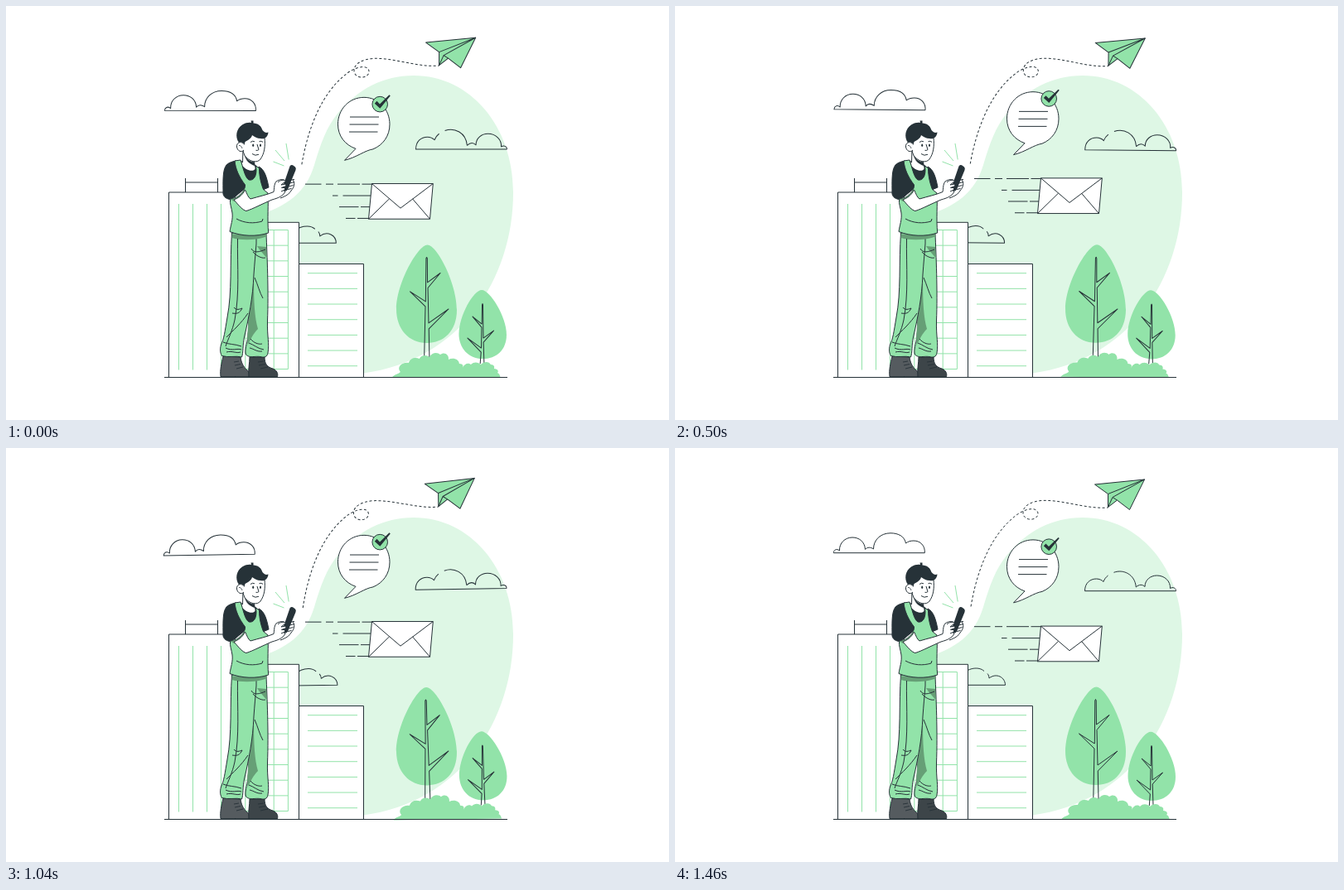
Write an HTML page with a canvas that moves like this. It is 800x500 px and loops after 1500 ms.

```html
<!DOCTYPE html>
<html lang="en">
<head>
<meta charset="utf-8">
<title>Message delivery</title>
<style>
  html, body { margin: 0; width: 100%; height: 100%; overflow: hidden; background: #fff; }
  canvas { display: block; width: 800px; height: 500px; }
</style>
</head>
<body>
<canvas id="stage"></canvas>
<script>
const canvas = document.getElementById('stage');
const ctx = canvas.getContext('2d');
const ratio = window.devicePixelRatio || 1;
canvas.width = 800 * ratio;
canvas.height = 500 * ratio;

const LOOP = 1500, FRAMES = 36;
const INK = '#263238', GREEN = '#92e3a9', PALE = '#def7e5', SHADE = '#669f76', WHITE = '#fff';

function shape(d, fill, stroke = INK, width = 1) {
  const path = new Path2D(d);
  if (fill) { ctx.fillStyle = fill; ctx.fill(path); }
  if (stroke) { ctx.strokeStyle = stroke; ctx.lineWidth = width; ctx.stroke(path); }
}
const line = (d, color = INK, width = 1) => shape(d, null, color, width);
const solid = (d, color) => shape(d, color, null);

function ellipse(x, y, rx, ry, fill, stroke) {
  ctx.beginPath();
  ctx.ellipse(x, y, rx, ry, 0, 0, 2 * Math.PI);
  if (fill) { ctx.fillStyle = fill; ctx.fill(); }
  if (stroke) { ctx.strokeStyle = stroke; ctx.lineWidth = 1; ctx.stroke(); }
}

function rotated(x, y, degrees, draw) {
  ctx.save();
  ctx.translate(x, y);
  ctx.rotate(degrees * Math.PI / 180);
  ctx.translate(-x, -y);
  draw();
  ctx.restore();
}

function drawBackdrop() {
  solid('M492 84 C560 84 612 145 612 225 C612 330 548 428 431 443.5 H300 V254 C340 242 362 225 372 192 C380 165 387 146 400 130 C425 100 455 84 492 84Z', PALE);
}

function drawClouds() {
  line('M191.3 126.7 H301.3 C302 118 296 112 288 112 C284 112 281 113 278.5 115 C277 107 270 102.8 260 102.8 C248 102.8 239.5 111 239.5 122 C236 119.5 232 119.5 229.5 122.5 C229 113 222 108 214 108 C205 108 198 115 198.5 124 C195 121 191.5 123 191.3 126.7Z');
  line('M604.5 172.7 H494.5 C494.5 163 501 158 508.5 158 C512 158 515 159.5 517 161.5 C518 158.5 520 156 522.5 154 M529.5 150.3 C541 146 555 152.5 556.3 168 C560 164.5 564 164.5 567 167.5 C567 159 574 154 581.5 154 C591 154 598 161 597.5 169.5 C601 167.5 604.5 169 604.5 172.7');
  line('M345 276 C352 265 367 263.5 373 269.5 M377 272.5 C378.3 274 379 276 379 278 C388 271 398.5 277 398.5 286.3 H345');
}

function drawBuildings() {
  line('M216.5 208 V225 M255.5 208 V225 M216.5 213 H255.5');
  shape('M196.5 225 H276.5 V448.5 H196.5Z', WHITE);
  for (let i = 0; i < 4; i++) line(`M${208.5 + i * 17} 239 V439.5`, GREEN);

  shape('M276.5 261.3 H353.5 V448.5 H276.5Z', WHITE);
  for (let i = 0; i < 4; i++) line(`M${288.8 + i * 17.2} 270.5 V438.5`, GREEN);
  for (let i = 0; i < 10; i++) line(`M288.8 ${270.5 + i * 18.67} H340.4`, GREEN);

  shape('M353.5 311.5 H431.5 V448.5 H353.5Z', WHITE);
  for (let i = 0; i < 7; i++) line(`M364 ${322.7 + i * 18.67} H424`, GREEN);
}

function drawTrees() {
  solid('M508.3 288.5 C520 288.5 544 335 544 367 C544 393 528 407 508 407 C486 407 471 390 471 366 C471 335 497 288.5 508.3 288.5Z', GREEN);
  line('M504.8 424 L506 363 L487.5 345 L506.3 357 L506.8 305 Q507.5 302 508.2 305 L508.5 334 L524 322.5 L509 340.5 L510 383 L534 366 L510.3 390 L511 424');
  solid('M574 342.8 C584 342.8 604 375 604 397 C604 415 592 426 575 426 C558 426 546.5 413 546.5 396 C546.5 374 564 342.8 574 342.8Z', GREEN);
  line('M572.3 432 L573.3 418 L557 401 L573.6 413 L574 388 L563 375 L574.2 384 L574.5 361 Q575 358 575.5 361 L576 401 L588.5 392 L576.2 406 L577 432');
  solid('M466 448.5 C470 444 473 445 476 442 C471 436 478 430 486 431 C488 425 494 424 499 426 C501 421 508 421 511 424 C514 418 521 418 524 421 C529 417 535 421 534 427 C540 424 547 427 547 432 C552 432 552 435 551 437 C553 432 558 430 561 433 C565 429 570 430 573 433 C577 429 583 429 585 433 C589 433 590 436 589 438 C594 438 595 442 593 443 C596 444 596 447 597 448.5Z', GREEN);
}

function drawPlane() {
  ctx.setLineDash([3, 2.5]);
  line('M357 191.5 C364 150 380 105 412 81 C424 72 438 71 438 79.5 C437 88.5 421 88.5 420 79 C419 70 430 64.5 442 63.5 C468 62 495 74 522.5 72');
  ctx.setLineDash([]);
  shape('M506.5 44 L566.5 38 L548.5 74.5 L533.5 63 L522.5 71.5 V55.5Z', GREEN);
  line('M522.5 55.5 L566.5 38 L528 59.5 L522.5 71.5 M528 59.5 L533.5 63');
}

function drawMessages() {
  shape('M422 172.5 C409 168 400.5 157 400.5 143 C400.5 125 414 110.5 432 110.5 C449.5 110.5 463 125 463 143 C463 157 455 168 443 173 C433 174.5 423 183 408.5 186.5 Z', WHITE);
  line('M415 134.2 H450 M414.5 143.2 H449.5 M414 152.2 H448.5');
  ellipse(451.2, 118.8, 9.3, 9.3, GREEN, INK);
  solid('M447.5 115 L451 118.6 L462.5 107.5 L463.8 108.6 L451.3 123.8 L444.8 117.8Z', INK);

  shape('M441.5 214.7 H515.3 L511.5 257.4 H437.5Z', WHITE);
  line('M441.5 214.7 L476 244.3 L515.3 214.7 M437.5 257.4 L462.5 233 M511.5 257.4 L490.5 233');
  line('M361 215.3 H380.5 M386 215.3 H395 M400 215.3 H427 M429.5 215.3 H441.5');
  line('M394 229.2 H400.5 M406.5 229.2 H440 M402 242.8 H425.5 M428 242.8 H439 M410 256.6 H421.5 M424 256.6 H437.5');
}

function drawLegs() {
  // Boots
  shape('M262 423 L283 424 C284 431 286 435 291 440 C294 442 294 445 293 447.7 H259 C258 439 260 432 262 423Z', '#555b5f');
  shape('M294 424 H312 C312 432 315 436 322 438 C327 440 328.5 444 327.5 447.7 H293 C292 439 294 431 294 424Z', '#3d4549');
  line('M275 430 L281 429 M276 434 L283 432.5 M278 438 L286 436 M304 430 L311 429 M305 434 L313 432.5 M307 438 L316 436', INK, .9);

  // Trousers
  shape('M290 275 H314 C315 300 317 345 315.5 380 C315 400 318 407 316 419 C315 424 312 424.5 308 423.8 C301 422 294 426 289.5 421 C287.5 416 291 408 292 398 C295 375 290 330 290 275Z', GREEN);
  solid('M299 330 C299 358 300 376 304 390 C298 396 295 403 292 409 C290 400 292 385 295 365Z', SHADE);
  shape('M272.5 274 C270 310 273 345 267 376 C264 394 263 402 259.5 409 C257.5 416 259 420 260.5 422.5 C268 425 278 422 284.5 424 C286.5 419 285.5 409 287.5 400 C293 376 298 352 299 324 C300 310 301 300 302 287 V275Z', GREEN);
  solid('M272.8 275.5 H314.3 V278.5 C300 283.5 283 283 272.6 280Z', SHADE);
  solid('M303 290 C307 296 311 300 314.5 304 L314 291Z', SHADE);
  line('M279.5 281 C279 315 282 347 276 379 C273 393 268 402 265 411');
  line('M296 293 C299 299 306 297 313 294 M298 297 C303 303 310 305 313 304 M300 328 C304 337 306 346 310 353 M292 371 C284 383 274 392 266 400');
  line('M275 364 C278 368 282 366 285 365 C282 371 279 372 273 371 M262 406 C269 409 276 408 284 411 M265 413 C273 417 279 413 284 415 M266 418 C273 416 278 420 283 418');
  line('M293 407 C299 409 304 414 311 415 M294 413 C299 414 303 418 309 417 M295 402 C299 407 305 409 309 408');
}

function drawTorso() {
  // Shirt and vest
  shape('M305 194 C312 197 315 208 317 219 L310 222 L303 205Z', INK);
  shape('M277 187 L287 188 L302 193 L307 200 L309 220 L290 219 L272 234 C266 233 263 231 262 227 C262 213 261 198 266 192 C269 189 273 188 277 187Z', INK);
  solid('M285 180 L300 184 L300.5 197 C297 201 289 198 284.5 192Z', WHITE);
  shape('M276 187 L283 186 C286 194 288 207 293 210 C298 211 302 207 302 198 L301.5 193 L305.5 196 C305.5 206 308 215 310.5 221.5 L316 226 C317 240 315 256 316.7 274 C302 279 284 278 270 272.5 C271 265 274 258 273 250 C272 243 270 239 270.5 234 C280 232 289 224 288.5 216 C281 206 277 197 276 187Z', GREEN);
  solid('M270.5 233 C279 233 284 228 288 221 L291 235 L275 236Z', SHADE);
  line('M278 257 C288 262.5 299 263 309 260 L310 257');
}

function drawHead() {
  line('M286 172 L285.5 189 M299 187 L300.5 194');
  solid('M287 178 C290 186 295 188 300 188.5 L300.3 193 C294 191 289 187 287 178Z', INK);
  shape('M286 156 C293 151 307 151 312 159 C313 169 312 178 307 185 C303 190 295 188 290 183 C287 180 286 175 285.5 172Z', WHITE);
  shape('M286.5 166 C283 163 278 165 278.5 170 C279 175 284 177.5 287 174', WHITE);
  line('M281 168.5 C283 168 284.5 170 285 172', INK, .8);
  solid('M281 165 C276 158 278 148 285 143.5 C289 141 293 140.5 296 141 L295.5 138.5 L298.5 138.5 L298.5 141.5 C304 141.5 308 145 309.5 150 C312 153 314 153.5 316.5 152.5 C316 158 312 161.5 307 160 C303 160 300 158 297 156 C296 160 292 162 288.5 164 L287.5 168 L286 165 C284 164 282 164 281 165Z', INK);
  ellipse(298.2, 168.2, 1, 1.8, INK);
  ellipse(307, 168.2, 1, 1.8, INK);
  line('M295 164.5 Q297.5 162.3 300 163.8 M305.5 163.8 Q307.5 162.5 310 164.3 M303 167 L305 173.5 Q303.5 175 301.5 174.3 M297 178.5 Q300.5 181.5 305 179.3');
}

function drawArms() {
  shape('M317 224 C325 224 332 222 337 216 L346 212 C349 215 347 220 343 225 C337 231 327 234 317 246Z', WHITE, null);
  line('M331 232 C337 230 342 227 344 223 C348 219 349 213 346 210');
  shape('M275 234 C280 232 285 229 288.5 222 C291 227 292 231 295 233 C305 230 315 228 323 224.5 C324 220 323 216 326 212 C330 209 335 209 337 211 C333 213 331 216 331 218 L337 216.5 L338 219 L334 222 L337 224 C334 230 328 232 321 234 C309 239 298 245 290 247.5 C286 247 281 241 275 234Z', WHITE);
  solid('M342.5 193.5 Q344 191.5 346 192.3 L348.8 194.3 Q350.5 196 349.5 198.2 L340 221.5 Q338.5 224 336.2 223.2 L334.5 222.2 Q333 221 333.8 218.8Z', INK);
  shape('M328 213 C331 210 335 209.5 337.5 211.5 L332 216 L337.5 215 L338 217.5 L332.5 219.5 L336.5 219.5 L336.5 222 L332 224', WHITE);
  line('M344 210 L348 209.5 M342.5 214 L348 212.5 M341 218 L346.5 216.5 M340 221.5 L344.5 220.5');
  line('M325 174 L336 187 M338 166 L341.2 185.5 M322.5 188 L335.5 193', GREEN);
}

function drawMan() {
  drawLegs();
  drawTorso();
  drawHead();
  drawArms();
}

// Straight-line sway: 0, +1, 0, -1, 0 degrees over the loop.
function sway(phase) {
  if (phase < .25) return phase * 4;
  return phase < .75 ? 2 - phase * 4 : phase * 4 - 4;
}

function render(now) {
  const step = Math.floor((now % LOOP + 4) * FRAMES / LOOP) % FRAMES;
  const phase = (step + 1) / FRAMES;
  const angle = sway(phase);
  const lift = 10 * (1 - Math.abs(1 - 2 * phase));

  ctx.setTransform(ratio, 0, 0, ratio, 0, 0);
  ctx.lineJoin = 'round';
  ctx.lineCap = 'butt';
  ctx.fillStyle = WHITE;
  ctx.fillRect(0, 0, 800, 500);

  drawBackdrop();
  rotated(398, 195, angle, drawClouds);
  drawBuildings();
  rotated(535, 368, angle, drawTrees);
  line('M191 448.5 H605');
  rotated(462, 115, angle, drawPlane);
  drawMan();

  ctx.save();
  ctx.translate(0, .4 - lift);
  drawMessages();
  ctx.restore();
}

const start = performance.now();
function tick() {
  render(performance.now() - start);
  requestAnimationFrame(tick);
}
tick();
</script>
</body>
</html>
```
